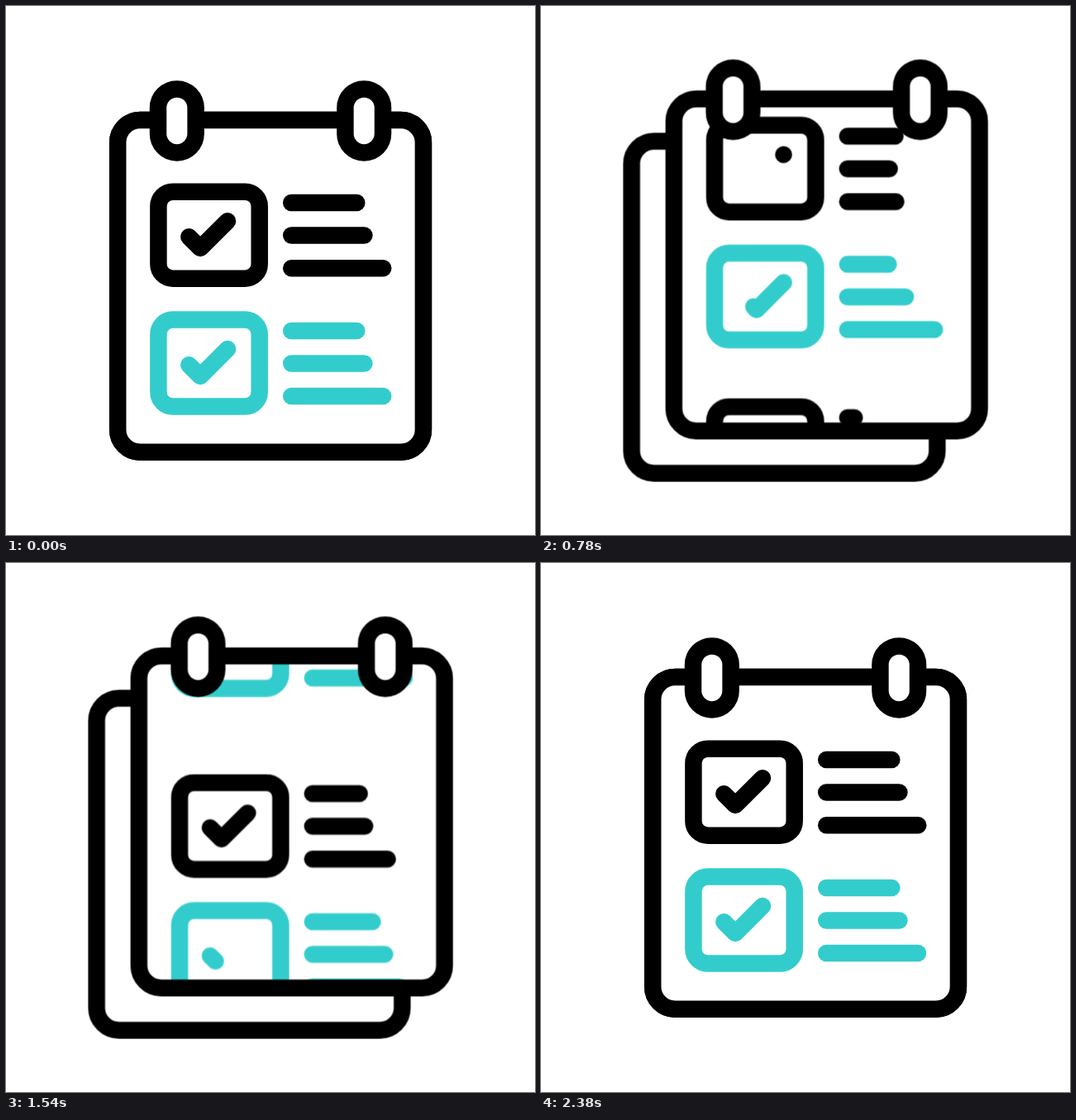
An HTML page that plays this animation: 640x640 px, repeating every 2400 ms.

```html
<!DOCTYPE html>
<html lang="en">
<head>
<meta charset="utf-8">
<title>Checklist</title>
<style>
  html, body { margin: 0; width: 100%; height: 100%; overflow: hidden; background: #fff; }
  svg { display: block; width: 100vw; height: 100vh; }

  svg * {
    animation-duration: 2400ms;
    animation-iteration-count: infinite;
    animation-fill-mode: backwards;
    animation-timing-function: cubic-bezier(.33333, 0, .66667, 1);
  }
  .ink { fill: none; stroke: #000; stroke-width: 20.5; stroke-linecap: round; stroke-linejoin: round; }
  .paper { fill: #fff; }
  .item { --g: 0; }
  .teal { --g: 1; stroke: #3cc; }

  /* the two sheets slide apart and back */
  .front { animation-name: front; }
  .back { animation-name: back; }
  .late { animation-name: late; }
  @keyframes front {
    0%, 8.3333%, 91.6667%, 100% { transform: translate(0, 0); }
    29.1667%, 70.8333% { transform: translate(25.6px, -25.6px); }
  }
  @keyframes back {
    0%, 8.3333%, 91.6667%, 100% { transform: translate(0, 0); }
    29.1667%, 70.8333% { transform: translate(-25.6px, 25.6px); }
  }
  @keyframes late {
    0%, 8.3333% { transform: translate(0, 0); }
    33.3333%, 100% { transform: translate(25.6px, -25.6px); }
  }

  /* one list scrolls out while the next scrolls in */
  .leave { animation-name: leave; }
  .enter { animation-name: enter; }
  @keyframes leave {
    0%, 16.6667% { transform: translateY(0); }
    83.3333%, 100% { transform: translateY(-384px); }
  }
  @keyframes enter {
    0%, 16.6667% { transform: translateY(333.3px); }
    83.3333%, 100% { transform: translateY(0); }
  }

  /* text lines shorten and grow again, one after another */
  .line { stroke-dasharray: 1 3; animation-delay: calc(var(--i) * 100ms + var(--g) * 300ms); }
  .l1 { --i: 0; --dip: .29; }
  .l2 { --i: 1; --dip: .3; }
  .l3 { --i: 2; --dip: .28; }
  .leave .line { animation-name: dip; }
  .enter .line { animation-name: grow; }
  @keyframes dip {
    0%, 8.3333%, 41.6667%, 100% { stroke-dashoffset: 0; }
    25% { stroke-dashoffset: .475; }
  }
  @keyframes grow {
    0%, 29.1667% { stroke-dashoffset: 1; }
    45.8333%, 79.1667%, 100% { stroke-dashoffset: 0; }
    62.5% { stroke-dashoffset: var(--dip); }
  }

  /* ticks are wiped off, then drawn on */
  .tick { stroke-dasharray: 1 3; animation-delay: calc(var(--g) * 400ms); }
  .leave .tick { animation-name: wipe; }
  .enter .tick { animation-name: draw; }
  @keyframes wipe {
    0%, 8.3333% { stroke-dashoffset: 0; }
    33.3333% { stroke-dashoffset: -1; }
    33.3433%, 80% { stroke-dashoffset: -1.2; }
    80.01%, 100% { stroke-dashoffset: 0; }
  }
  @keyframes draw {
    0%, 41.6567% { stroke-dashoffset: 1.2; }
    41.6667% { stroke-dashoffset: 1; }
    66.6667%, 100% { stroke-dashoffset: 0; }
  }
</style>
</head>
<body>
<svg viewBox="0 0 640 640">
  <defs>
    <rect id="sheet" x="135.2" y="138.1" width="369.7" height="401.6" rx="27"/>
    <rect id="box" x="184.4" y="224.7" width="122.3" height="105" rx="17.5"/>
    <rect id="ring" x="184" y="100.4" width="45.6" height="77" rx="22.8"/>
    <clipPath id="inside"><use href="#sheet"/></clipPath>
  </defs>

  <g class="ink">
    <g class="back"><use href="#sheet" class="paper"/></g>

    <g class="front">
      <use href="#sheet" class="paper" stroke="none"/>
      <g clip-path="url(#inside)">
        <g class="leave">
          <g class="item">
            <use href="#box"/>
            <path class="line l1" pathLength="1" d="M345.2 238.1H424.3"/>
            <path class="line l2" pathLength="1" d="M345.2 277.6H433.4"/>
            <path class="line l3" pathLength="1" d="M345.2 317.2H456.2"/>
          </g>
          <g class="item teal" transform="translate(0 154.9)">
            <use href="#box"/>
            <path class="tick" pathLength="1" d="M221.3 279.3L235.1 293L268 260.2"/>
            <path class="line l1" pathLength="1" d="M345.2 238.1H424.3"/>
            <path class="line l2" pathLength="1" d="M345.2 277.6H433.4"/>
            <path class="line l3" pathLength="1" d="M345.2 317.2H456.2"/>
          </g>
        </g>
        <g class="enter">
          <g class="item">
            <use href="#box"/>
            <path class="tick" pathLength="1" d="M221.3 279.3L235.1 293L268 260.2"/>
            <path class="line l1" pathLength="1" d="M345.2 238.1H424.3"/>
            <path class="line l2" pathLength="1" d="M345.2 277.6H433.4"/>
            <path class="line l3" pathLength="1" d="M345.2 317.2H456.2"/>
          </g>
          <g class="item teal" transform="translate(0 154.9)">
            <use href="#box"/>
            <path class="tick" pathLength="1" d="M221.3 279.3L235.1 293L268 260.2"/>
            <path class="line l1" pathLength="1" d="M345.2 238.1H424.3"/>
            <path class="line l2" pathLength="1" d="M345.2 277.6H433.4"/>
            <path class="line l3" pathLength="1" d="M345.2 317.2H456.2"/>
          </g>
        </g>
      </g>
      <use href="#sheet"/>
      <use href="#ring" class="paper"/>
      <use href="#ring" class="paper" x="226.4"/>
    </g>

    <!-- the first tick trails the sheet slightly -->
    <g class="late">
      <g class="leave">
        <g class="item"><path class="tick" pathLength="1" d="M221.3 279.3L235.1 293L268 260.2"/></g>
      </g>
    </g>
  </g>
</svg>
</body>
</html>
```
